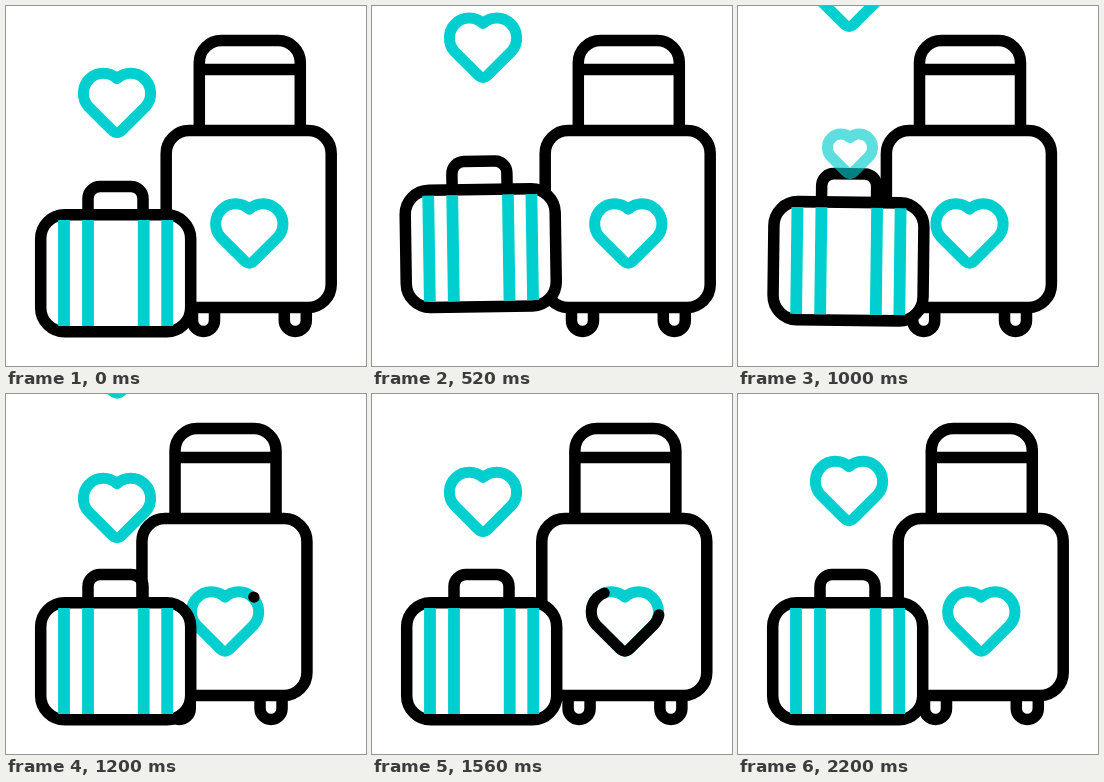
These frames come from a looping animation (360x360 px, 2240 ms). An HTML page:

```html
<!DOCTYPE html>
<html lang="en">
<head>
<meta charset="utf-8">
<title>Luggage</title>
<style>
html, body { margin: 0; width: 100%; height: 100%; overflow: hidden; background: #fff; }
svg { display: block; width: 100vw; height: 100vh; }
path, rect { fill: none; stroke: #000; stroke-width: 11.5; stroke-linejoin: round; stroke-linecap: round; }
.fill { fill: #fff; }
.teal { stroke: #00cecf; stroke-width: 11; vector-effect: non-scaling-stroke; }
.stripes { stroke: #00cecf; stroke-width: 11.8; stroke-linecap: butt; }
#trace { stroke-width: 11; }
</style>
</head>
<body>
<svg viewBox="0 0 360 360">
  <defs>
    <path id="heart" class="teal" d="M-5 27.2L-28.6 3.6A20 20 0 0 1 0-24.3A20 20 0 0 1 28.6 3.6L5 27.2Q0 32.2-5 27.2Z"/>
  </defs>
  <g id="trolley">
    <path d="M193.3 124V56.5a22 22 0 0 1 22-22h57a22 22 0 0 1 22 22V124M193.3 63.5h101"/>
    <path d="M186.5 302v12.5a11 11 0 0 0 22 0V302M278.3 302v12.5a11 11 0 0 0 22 0V302"/>
    <rect class="fill" x="160.2" y="124.5" width="165" height="177" rx="23"/>
    <g transform="translate(243.3 227.5)">
      <use href="#heart"/>
      <path id="trace" pathLength="1" d="M28.6-24.6A20 20 0 0 1 28.6 3.6L5 27.2Q0 32.2-5 27.2L-28.6 3.6A20 20 0 0 1 0-24.3A20 20 0 0 1 28.6-24.6"/>
    </g>
  </g>
  <g id="bag">
    <path d="M82 208V192.5a12 12 0 0 1 12-12h31a12 12 0 0 1 12 12V208"/>
    <rect class="fill" x="34.7" y="208.7" width="150" height="117" rx="24"/>
    <path class="stripes" d="M58 214V320M82 214V320M137.7 214V320M161.2 214V320"/>
  </g>
  <use id="rising" href="#heart"/>
  <use id="next" href="#heart"/>
</svg>
<script>
const LOOP = 2240, STEP = 40;
const $ = id => document.getElementById(id);
const linear = u => u;
const sine = u => (1 - Math.cos(Math.PI * u)) / 2;

// Value at time t along [time, value] keys
function track(t, keys, ease = sine) {
  if (t <= keys[0][0]) return keys[0][1];
  for (let i = 1; i < keys.length; i++) {
    const [t0, a] = keys[i - 1], [t1, b] = keys[i];
    if (t < t1) return a + (b - a) * ease((t - t0) / (t1 - t0));
  }
  return keys[keys.length - 1][1];
}

function set(id, attrs) {
  for (const name in attrs) $(id).setAttribute(name, attrs[name]);
}

function draw(t) {
  const slide = track(t, [[280, 0], [710, 22], [1160, -25], [1590, 10], [2040, 0]]);
  set('trolley', { transform: `translate(${slide} 0)` });

  const lift = track(t, [[280, 0], [650, -34.5], [780, -34.5], [1140, 0]]);
  const tilt = track(t, [[470, 0], [640, -4.4], [820, 3.2], [1080, 0]]);
  const stretch = track(t, [[0, 1], [280, 0.9], [480, 1], [760, 1.03], [1140, 1]]);
  set('bag', {
    transform: `translate(110 ${331 + lift}) rotate(${tilt}) scale(1 ${stretch}) translate(-110 -331)`
  });

  // Black line running clockwise round the trolley's heart
  const head = track(t, [[1180, 0], [1760, 1]]);
  const tail = track(t, [[1440, 0], [2040, 1]]);
  set('trace', {
    'stroke-dasharray': `${Math.max(head - tail, 0.001)} 2`,
    'stroke-dashoffset': -tail,
    visibility: head > 0 && tail < 1 ? 'visible' : 'hidden'
  });

  set('rising', { transform: `translate(111 ${97 - 0.10625 * t})` });

  // The next heart leaves the bag and leans with it
  const x = 111 + 1.4 * tilt;
  const y = track(t, [[560, 221], [800, 195], [1140, 115], [2200, 97]], linear);
  const size = track(t, [[560, 0.1], [800, 0.2], [1140, 1]], linear);
  const alpha = track(t, [[560, 0], [800, 0.1], [1140, 1]], linear);
  set('next', { transform: `translate(${x} ${y}) scale(${size})`, opacity: alpha });
}

const start = performance.now();
function tick() {
  const t = (performance.now() - start) % LOOP;
  draw(Math.floor(t / STEP) * STEP);
  requestAnimationFrame(tick);
}
tick();
</script>
</body>
</html>
```
